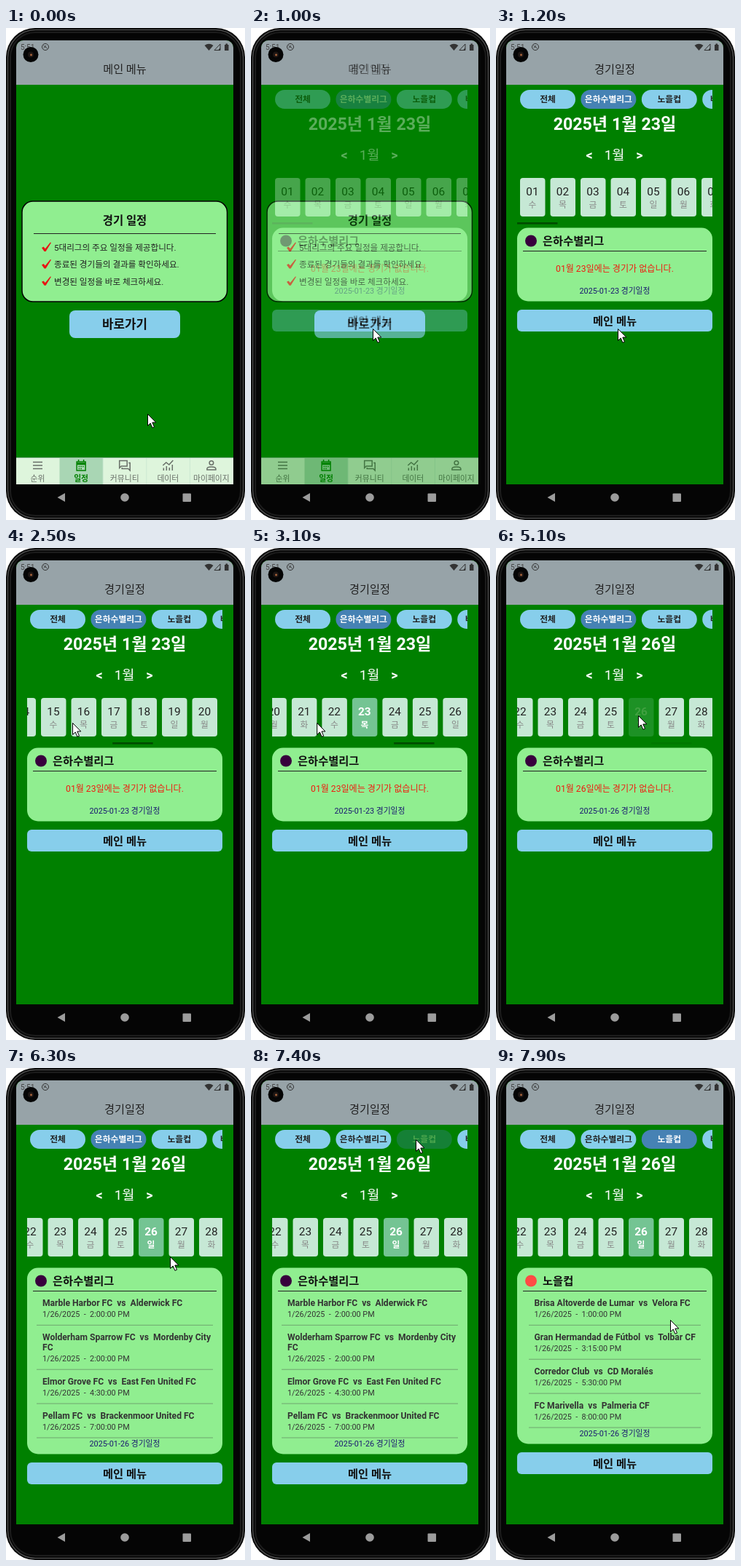
Animation, 328 px wide and 676 px high, one loop 8000 ms. Source, as an HTML page:

```html
<!DOCTYPE html>
<html lang="ko">
<head>
<meta charset="utf-8">
<title>경기일정</title>
<style>
  html, body { margin: 0; width: 100%; height: 100%; overflow: hidden; background: #fff; }
  svg { display: block; width: 328px; height: 676px; }
  text { font-family: Roboto, "Noto Sans CJK KR", "Noto Sans CJK", "Noto Sans CJK JP", sans-serif; white-space: pre; }
</style>
</head>
<body>
<svg id="stage" viewBox="0 0 328 676" xmlns="http://www.w3.org/2000/svg">
  <defs>
    <clipPath id="screen"><path d="M14 627V27a10 10 0 0 1 10-10H302a10 10 0 0 1 10 10V627Z"/></clipPath>
    <clipPath id="strip"><rect x="29" y="80" width="268" height="192"/></clipPath>
  </defs>
</svg>
<script>
const NS = 'http://www.w3.org/2000/svg';
const stage = document.getElementById('stage');

function el(tag, attrs, parent, text) {
  const node = document.createElementNS(NS, tag);
  set(node, attrs);
  if (text !== undefined) node.textContent = text;
  parent.appendChild(node);
  return node;
}
function set(node, attrs) {
  for (const key in attrs) node.setAttribute(key, attrs[key]);
}
const group = (parent, attrs = {}) => el('g', attrs, parent);
const box = (parent, x, y, width, height, rx, fill, more) =>
  el('rect', { x, y, width, height, rx, fill, ...more }, parent);
const path = (parent, d, attrs) => el('path', { d, fill: 'none', ...attrs }, parent);
const label = (parent, text, x, y, size, fill, weight = 400, anchor = 'middle') =>
  el('text', { x, y, 'font-size': size, fill, 'font-weight': weight, 'text-anchor': anchor }, parent, text);
const rule = (parent, x1, x2, y, color) =>
  path(parent, `M${x1} ${y}H${x2}`, { stroke: color, 'stroke-width': 1 });

const GREEN = '#008000', LIGHT = '#90ee90', SKY = '#87ceeb', STEEL = '#4682b4', INK = '#222';
const LEAGUES = ['은하수별리그', '노을컵'];
const MARKS = ['#37003c', '#ff4b44'];

// Phone body
box(stage, 0, 0, 328, 676, 40, '#050505');
box(stage, 2.5, 2.5, 323, 671, 38, 'none', { stroke: '#484848', 'stroke-width': 1.6 });
box(stage, 6, 6, 316, 664, 34, 'none', { stroke: '#1c1c1c', 'stroke-width': 2 });

const screen = group(stage, { 'clip-path': 'url(#screen)' });
box(screen, 14, 17, 298, 610, 0, GREEN);

function header(page, title) {
  box(page, 14, 17, 298, 61, 0, '#97a3a8');
  label(page, title, 163, 62, 15.2, INK);
}

// Menu page
const menu = group(screen);
header(menu, '메인 메뉴');
box(menu, 22, 238, 281.5, 138, 15, LIGHT, { stroke: '#000', 'stroke-width': 1.5 });
label(menu, '경기 일정', 163, 269.5, 15.4, '#111', 700);
rule(menu, 38, 288, 282.5, '#222');
['5대리그의 주요 일정을 제공합니다.',
 '종료된 경기들의 결과를 확인하세요.',
 '변경된 일정을 바로 체크하세요.'].forEach((line, i) => {
  const y = 306 + i * 23.4;
  path(menu, `M49 ${y - 4}l2.6-1.4 2.2 2.6 7-8.6 1.2.4-7.4 12h-2Z`, { fill: '#e81414' });
  label(menu, line, 66, y, 11.6, INK, 400, 'start');
});
const goButton = group(menu);
box(goButton, 87, 388, 152, 38, 8, SKY);
label(goButton, '바로가기', 163, 413, 16.8, '#111', 700);

// Tab bar
box(menu, 14, 590, 298, 37, 0, '#def5dc');
box(menu, 73.5, 590, 59.5, 37, 0, '#a9d6b4');
rule(menu, 14, 312, 590.5, '#8fb79a');
const TABS = [
  ['순위', 'M-6.5-4.5H6.5M-6.5 0H6.5M-6.5 4.5H6.5'],
  ['일정', 'M-6-5H6V7H-6ZM-6-3H6M-6-1.5H6M-3.5-8V-5M3.5-8V-5M-3.5 1.5h1.5M-.8 1.5h1.6M2 1.5h1.5M-3.5 4.5h1.5M-.8 4.5h1.6'],
  ['커뮤니티', 'M-7-6.5H3.5V1H-4.5L-7 3.5ZM5.5-3.5H7.5V7L5 4.5H-3.5V3'],
  ['데이터', 'M-6 7V3.5M-2 7V1M2 7V3M6 7V-1M-7 0L-2.5-4 1.5-1 7-7'],
  ['마이페이지', 'M-2.8-3.5a2.8 2.8 0 1 0 5.6 0a2.8 2.8 0 1 0-5.6 0M-6 6V4.5C-6 1 6 1 6 4.5V6Z']
];
TABS.forEach(([name, d], i) => {
  const x = 43.5 + i * 59.6, on = i === 1, color = on ? GREEN : '#686f68';
  if (i > 1) path(menu, `M${14 + i * 59.6} 591V627`, { stroke: '#cbe8d2' });
  path(menu, d, { stroke: color, 'stroke-width': 1.5, transform: `translate(${x} 601)` });
  label(menu, name, x, 622.8, 10.8, color, on ? 700 : 500);
});

// Schedule page
const schedule = group(screen);
box(schedule, 14, 17, 298, 610, 0, GREEN);
header(schedule, '경기일정');

const chipRow = group(schedule, { 'clip-path': 'url(#strip)' });
const chips = ['전체', ...LEAGUES, '바람골리그'].map((name, i) => {
  const x = 33 + i * 83.4, g = group(chipRow);
  return { g, bg: box(g, x, 85, 76, 26, 13, SKY), text: label(g, name, x + 38, 102.3, 11.8, INK, 700) };
});

const dayTitle = label(schedule, '', 163, 140, 23.2, '#fff', 700);
label(schedule, '<', 128, 181, 18, '#fff', 700);
label(schedule, '1월', 162.5, 181, 18.6, '#fff');
label(schedule, '>', 197, 181, 18, '#fff', 700);

const PITCH = 41.5, VIEW = 268, CONTENT = 31 * PITCH + 8;
const dayClip = group(schedule, { 'clip-path': 'url(#strip)' });
const dayRow = group(dayClip);
const days = Array.from({ length: 31 }, (_, i) => {
  const x = 33 + i * PITCH, g = group(dayRow);
  return {
    g,
    bg: box(g, x, 206, 34.5, 53, 4, '#c6e8d5'),
    num: label(g, String(i + 1).padStart(2, '0'), x + 17, 230, 15.4, INK),
    name: label(g, '수목금토일월화'[i % 7], x + 17, 247, 11.8, '#888')
  };
});
const thumb = box(dayClip, 29, 267, VIEW * VIEW / CONTENT, 2.6, 0, '#000', { 'fill-opacity': .42 });

const card = box(schedule, 29, 274.5, 268, 101, 15, LIGHT);
const mark = el('circle', { cx: 48, cy: 292.5, r: 8 }, schedule);
const leagueTitle = label(schedule, '', 64, 298, 15.3, '#111', 700, 'start');
rule(schedule, 37, 289, 306.5, '#222');
const notice = label(schedule, '', 163, 335, 12.1, '#f01c10');

const FIXTURES = [
  { x: 50, left: 42, right: 284, games: [
    ['Marble Harbor FC  vs  Alderwick FC', '2:00'],
    ['Wolderham Sparrow FC  vs  Mordenby City\nFC', '2:00'],
    ['Elmor Grove FC  vs  East Fen United FC', '4:30'],
    ['Pellam FC  vs  Brackenmoor United FC', '7:00']] },
  { x: 52.5, left: 45, right: 281, games: [
    ['Brisa Altoverde de Lumar  vs  Velora FC', '1:00'],
    ['Gran Hermandad de Fútbol  vs  Tolbar CF', '3:15'],
    ['Corredor Club  vs  CD Moralés', '5:30'],
    ['FC Marivella  vs  Palmeria CF', '8:00']] }
];
const lists = FIXTURES.map(({ x, left, right, games }) => {
  const g = group(schedule);
  let y = 327;
  for (const [teams, hour] of games) {
    teams.split('\n').forEach((line, i) => {
      if (i) y += 14;
      label(g, line, x, y, 12.1, '#333', 700, 'start');
    });
    label(g, `1/26/2025  -  ${hour}:00 PM`, x, y + 15, 10.8, '#333', 400, 'start');
    rule(g, left, right, y + 26.3, '#6fa56f');
    y += 46.9;
  }
  return g;
});
const footer = label(schedule, '', 163, 365, 10.8, '#191970');
const homeButton = group(schedule);
box(homeButton, 29, 387, 268, 30, 6, SKY);
label(homeButton, '메인 메뉴', 163, 408, 15.3, '#111', 700);

// Status bar
label(screen, '5:51', 20, 30, 10, '#444', 400, 'start');
el('circle', { cx: 54, cy: 26, r: 4.5, fill: 'none', stroke: '#333' }, screen);
path(screen, 'M51.5 24l5 4M52 27.5l3-3.5', { stroke: '#333' });
path(screen, 'M272.5 24Q278.500 19.500 284.500 24L278.500 31Z', { fill: '#333' });
path(screen, 'M286 30.500L294 22V30.500Z', { stroke: '#333' });
path(screen, 'M291 30.500L294 27V30.500Z', { fill: '#333' });
path(screen, 'M300 23h1.500v-1.500h2.500V23h1.500v8H300Z', { fill: '#333' });

// Camera and navigation keys
el('circle', { cx: 34, cy: 36.5, r: 10.5, fill: '#050505' }, stage);
el('circle', { cx: 34, cy: 36.5, r: 4, fill: '#1d1614' }, stage);
el('circle', { cx: 34.5, cy: 37, r: 1.4, fill: '#b0683c' }, stage);
path(stage, 'M81 639V651L70.500 645Z', { fill: '#9c9c9c' });
el('circle', { cx: 163, cy: 645, r: 5.8, fill: '#9c9c9c' }, stage);
box(stage, 242.5, 639.5, 11.5, 11.5, 1, '#9c9c9c');

const cursor = path(stage, 'M.5 .5V16.5L4.2 13 6.900 19.300 9.500 18.200 6.800 12H11.800Z',
  { fill: '#fff', stroke: '#000', 'stroke-width': 1 });

// Motion tables: [ms, value(s), easing into this step]
const smooth = p => p * p * (3 - 2 * p);
const out = p => 1 - (1 - p) ** 2;
const CURSOR = [
  [100, [194, 530]], [700, [167, 413]], [1250, [167, 413]],
  [1500, [283, 240]], [1900, [62, 240]], [2200, [256, 240]], [2500, [91, 240]],
  [2700, [22, 240]], [2900, [22, 240]], [3500, [285, 240]], [3600, [285, 240]],
  [3800, [297, 239]], [4000, [297, 239]], [4200, [273, 239]], [4800, [195, 230]],
  [5700, [195, 230]], [6000, [302, 360]], [6300, [225, 259]], [6600, [252, 120]],
  [6800, [226, 98], out], [7400, [226, 98]], [7900, [239, 346]]
];
const SCROLL = [
  [1500, [0]], [1900, [221]], [2200, [401], out], [2500, [566]], [2700, [635]],
  [3500, [864.5], out], [4000, [864.5]], [4200, [888.5]]
];
const GO = [[700, [1]], [800, [.3]], [900, [.3]], [1000, [1]]];
const PAGE = [[900, [0]], [1150, [1]]];
const THUMB = [[4500, [1]], [5300, [0]]];
const DAY = [[5100, [.25]], [5400, [1]]];
const CHIP = [[7500, [.3]], [7700, [1]]];

function at(steps, t) {
  const next = steps.findIndex(s => s[0] > t);
  if (next === 0) return steps[0][1];
  if (next < 0) return steps[steps.length - 1][1];
  const [t0, a] = steps[next - 1], [t1, b, ease = smooth] = steps[next];
  const p = ease((t - t0) / (t1 - t0));
  return a.map((v, i) => v + (b[i] - v) * p);
}

function draw(t) {
  const day = t < 5000 ? 23 : 26;
  const league = t < 7500 ? 0 : 1;
  const loaded = t >= 5500;
  const scroll = at(SCROLL, t)[0];

  set(cursor, { transform: `translate(${at(CURSOR, t)})` });
  set(goButton, { opacity: at(GO, t)[0] });
  set(schedule, { opacity: at(PAGE, t)[0] });

  chips.forEach(({ g, bg, text }, i) => {
    const on = i === (t < 7400 ? 1 : 2);
    set(bg, { fill: on ? STEEL : SKY });
    set(text, { fill: on ? '#fff' : INK });
    set(g, { opacity: i === 2 && t >= 7400 ? at(CHIP, t)[0] : 1 });
  });

  set(dayRow, { transform: `translate(${-scroll} 0)` });
  set(thumb, { x: 29 + scroll * VIEW / CONTENT, opacity: at(THUMB, t)[0] });
  days.forEach(({ g, bg, num, name }, i) => {
    const on = i + 1 === day, weight = on ? 700 : 400;
    set(bg, { fill: on ? '#74c493' : '#c6e8d5' });
    set(num, { fill: on ? '#fff' : INK, 'font-weight': weight });
    set(name, { fill: on ? '#fff' : '#888', 'font-weight': weight });
    set(g, { opacity: on && day === 26 ? at(DAY, t)[0] : 1 });
  });

  dayTitle.textContent = `2025년 1월 ${day}일`;
  leagueTitle.textContent = LEAGUES[league];
  set(mark, { fill: MARKS[league] });
  notice.textContent = loaded ? '' : `01월 ${day}일에는 경기가 없습니다.`;
  footer.textContent = `2025-01-${day} 경기일정`;
  lists.forEach((g, i) => set(g, { display: loaded && i === league ? 'inline' : 'none' }));

  const grow = !loaded ? 0 : league ? 141 : 155;
  set(card, { height: 101 + grow });
  set(footer, { y: 365 + grow });
  set(homeButton, { transform: `translate(0 ${grow})` });
}

const LOOP = 8000, STEP = 100;
const start = performance.now();
function tick() {
  const t = (performance.now() - start) % LOOP;
  draw(Math.floor(t / STEP) * STEP);
  requestAnimationFrame(tick);
}
draw(0);
requestAnimationFrame(tick);
</script>
</body>
</html>
```
